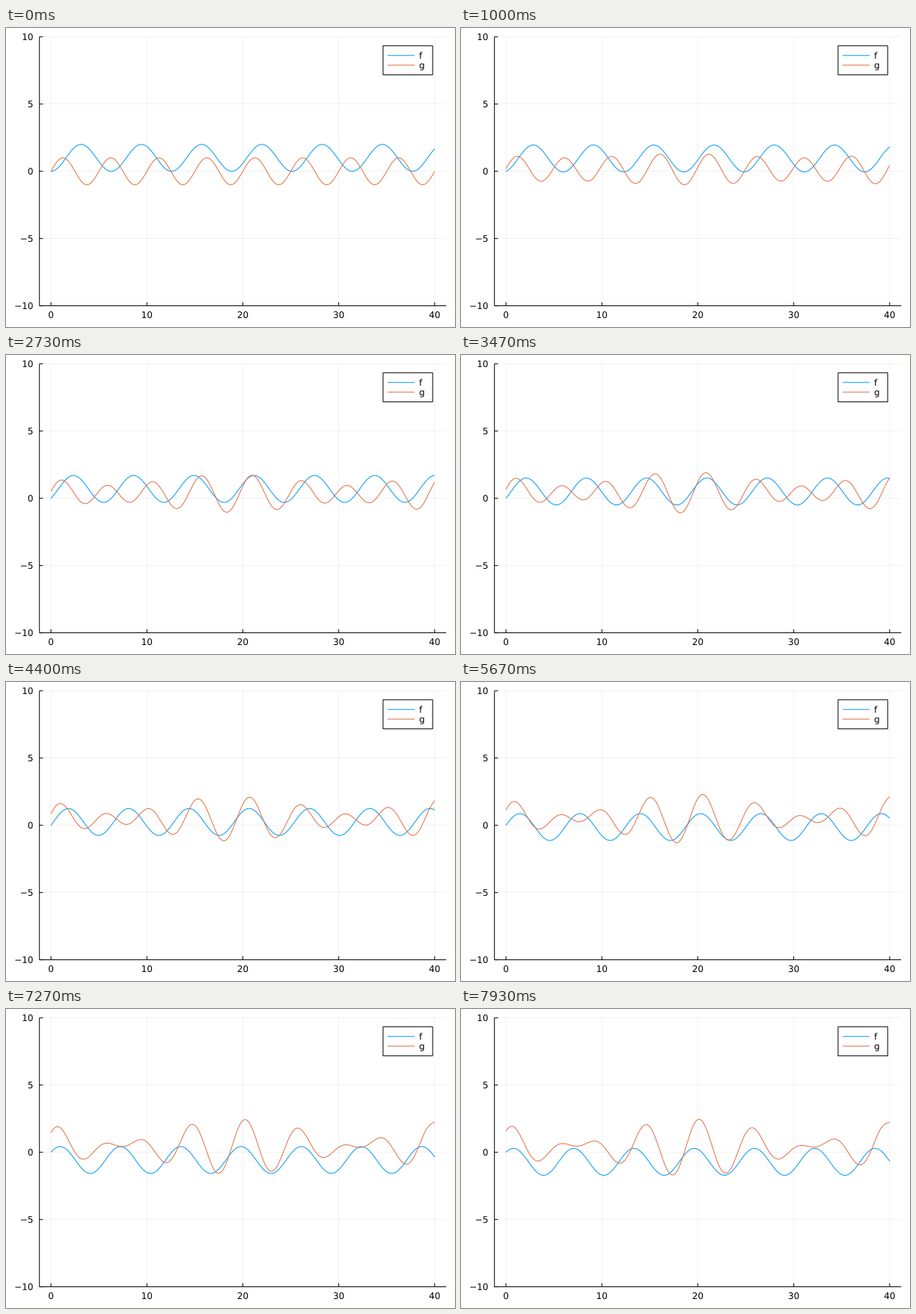
These frames come from a looping animation (600x400 px, 8000 ms). A matplotlib script:

```python
import numpy as np
import matplotlib.pyplot as plt
from matplotlib.animation import FuncAnimation
from matplotlib.patches import PathPatch, Rectangle
from matplotlib.textpath import TextPath

W, H, DPI = 600, 400, 100
FRAMES, LOOP_MS = 120, 8000
DT = 0.02
LEFT, RIGHT, TOP, BOTTOM = 44.7, 588.19, 11.81, 371.61
BLUE, ORANGE = "#009afa", "#e36f47"
PX = 72 / DPI
FONT = 12
DIGIT, MINUS = 0.636 * FONT, 0.838 * FONT

plt.rcParams["font.family"] = "DejaVu Sans"
fig = plt.figure(figsize=(W / DPI, H / DPI), dpi=DPI, facecolor="white")
ax = fig.add_axes([0, 0, 1, 1])
ax.set_xlim(0, W)
ax.set_ylim(0, H)
ax.axis("off")


def to_x(x):
    return LEFT + (x + 1.2) / 42.4 * (RIGHT - LEFT)


def to_y(y):
    return TOP + (10 - y) / 20 * (BOTTOM - TOP)


def line(xs, ys, color="black", width=1.0, z=2, **kw):
    """Polyline in pixels, y measured from the top."""
    ys = H - np.asarray(ys, float)
    return ax.plot(xs, ys, color=color, lw=width * PX, zorder=z, snap=False,
                   solid_capstyle="butt", solid_joinstyle="round", **kw)[0]


def label(x, baseline, text, align=0.0):
    """Text as outlines; align is the share of its width left of x."""
    width = sum(MINUS if c == "\u2212" else DIGIT for c in text)
    path = TextPath((x - align * width, H - baseline), text, size=FONT)
    ax.add_patch(PathPatch(path, fc="black", lw=0, zorder=6, snap=False))


def draw_axes():
    for v in range(0, 41, 10):
        x = to_x(v)
        line([x, x], [TOP, BOTTOM], width=0.5, z=1, alpha=0.1)
        line([x, x], [BOTTOM, BOTTOM - 4.72])
        label(x, 387.98, str(v), 0.5)
    for v in range(-10, 11, 5):
        y = to_y(v)
        line([LEFT, RIGHT], [y, y], width=0.5, z=1, alpha=0.1)
        line([LEFT, LEFT + 4.72], [y, y])
        label(36.5, y + 4.32, str(v).replace("-", "\u2212"), 1.0)
    line([LEFT, RIGHT], [BOTTOM, BOTTOM])
    line([LEFT, LEFT], [BOTTOM, TOP])


def draw_legend():
    x0, x1, y0, y1 = 503.9, 570.14, 23.8, 62.68
    ax.add_patch(Rectangle((x0, H - y1), x1 - x0, y1 - y0, fc="white",
                           ec="black", lw=PX, zorder=4, snap=False))
    for name, color, y in (("f", BLUE, 36.76), ("g", ORANGE, 49.72)):
        line([x0 + 6, x0 + 42.1], [y, y], color, z=5)
        label(x0 + 48.1, y + 4.32, name)


def f(x, t):
    return np.cos(t) - np.cos(x + t)


def g(x, t):
    # Wave moving left at speed 1/2, driven by f/2; f is held constant past x = 40.
    s = np.clip(t - 2 * (40 - x), 0, None)
    wave = np.sin(2 * np.pi * (x + t / 2) / 5)
    held = (np.sin(40) - np.sin(40 + s)) / 2
    return wave + np.sin(t) / 2 + held - np.sin(x + t) + np.sin(x + (t + s) / 2)


draw_axes()
draw_legend()
grid = np.linspace(0, 40, 401)
curve_f = line(to_x(grid), to_y(f(grid, 0)), BLUE, z=3)
curve_g = line(to_x(grid), to_y(g(grid, 0)), ORANGE, z=3.1)


def update(i):
    t = i * DT
    curve_f.set_ydata(H - to_y(f(grid, t)))
    curve_g.set_ydata(H - to_y(g(grid, t)))
    return curve_f, curve_g


anim = FuncAnimation(fig, update, frames=FRAMES, interval=LOOP_MS / FRAMES,
                     repeat=True, repeat_delay=0, init_func=lambda: update(0))
plt.show()
```
